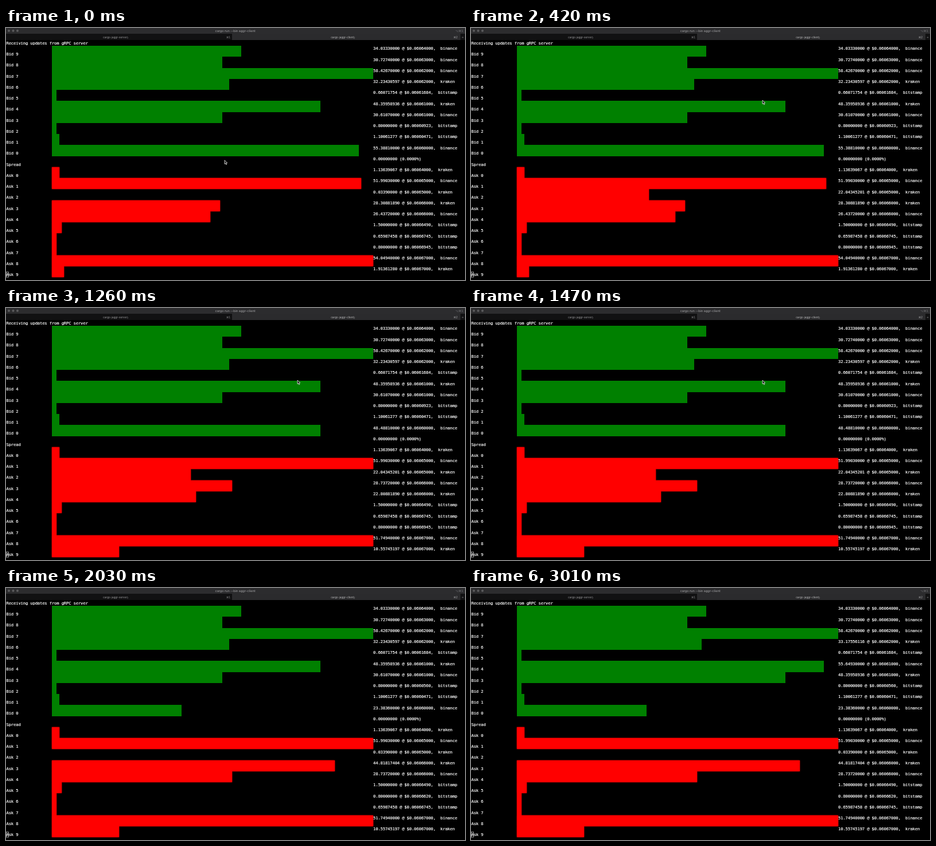
Recreate the animation shown at these times as an HTML page with a canvas. Size 800 by 440 pixels, loop 3.08 s.

```html
<!DOCTYPE html>
<html lang="en">
<head>
<meta charset="utf-8">
<title>Order book</title>
<style>
html, body { margin: 0; width: 100%; height: 100%; overflow: hidden; background: #000; }
canvas { display: block; width: 800px; height: 440px; }
</style>
</head>
<body>
<canvas id="stage" width="800" height="440"></canvas>
<script>
const ctx = document.getElementById('stage').getContext('2d');
const LOOP = 3080, STEP = 70;
const CELL = 4.18, LEFT = 0.6, LINE = 9.625, TOP = 31;
const MAX_CELLS = 134, BID_SCALE = 2.308;
const MONO = '"DejaVu Sans Mono", "Liberation Mono", monospace';
const SANS = 'Inter, "Liberation Sans", sans-serif';
const SYMBOLS = '"DejaVu Sans", sans-serif';

// Each row: size, price, exchange. Rows run from Bid 9 down to Ask 9.
const START = [
  '34.0333 .06064 binance', '30.7274 .06063 binance', '58.4267 .06062 binance',
  '32.23430597 .06062 kraken', '0.66071754 .06061684 bitstamp',
  '48.35958936 .06061 kraken', '30.6107 .06061 binance', '0.8 .06060923 bitstamp',
  '1.10061277 .06060471 bitstamp', '55.3881 .0606 binance',
  '',
  '1.13639067 .06064 kraken', '51.9903 .06065 binance', '0.0339 .06065 kraken',
  '28.3088189 .06066 kraken', '26.4372 .06066 binance', '1.5 .0606649 bitstamp',
  '0.65987458 .06066745 bitstamp', '0.8 .06066945 bitstamp',
  '54.0494 .06067 binance', '1.9136128 .06067 kraken'
];

const UPDATES = [
  { at: 210, rows: { 13: '22.04345201 .06065 kraken' } },
  { at: 630, rows: { 14: '26.4372 .06066 binance', 15: '22.8088189 .06066 kraken',
                     20: '5.05745197 .06067 kraken' } },
  { at: 1050, rows: { 9: '48.4881 .0606 binance', 14: '28.7372 .06066 binance',
                      19: '51.7494 .06067 binance', 20: '10.55745197 .06067 kraken' } },
  { at: 1540, rows: { 7: '0.8 .0606056 bitstamp', 9: '23.3836 .0606 binance',
                      13: '0.0339 .06065 kraken', 14: '44.81817404 .06066 kraken',
                      15: '28.7372 .06066 binance', 17: '0.8 .0606662 bitstamp',
                      18: '0.65987458 .06066745 bitstamp' } },
  { at: 2170, rows: { 5: '55.6493 .06061 binance', 6: '48.35958936 .06061 kraken' } },
  { at: 2730, rows: { 3: '33.17556116 .06062 kraken' } }
];

function bookAt(t) {
  const book = START.slice();
  for (const u of UPDATES) if (t >= u.at) Object.assign(book, u.rows);
  return book.map(r => {
    const [size, price, venue] = r.split(' ');
    return { size: +size, price: +price, venue };
  });
}

function rect(x, y, w, h, color) {
  ctx.fillStyle = color;
  ctx.fillRect(x, y, w, h);
}

// Set large and scaled down, so that glyph positions stay fractional.
function text(str, x, y, font, size, color, align, edge) {
  ctx.save();
  ctx.translate(x, y);
  ctx.scale(0.1, 0.1);
  ctx.font = `${font.weight || 400} ${size * 10}px ${font.family}`;
  ctx.textAlign = align;
  ctx.fillStyle = ctx.strokeStyle = color;
  ctx.fillText(str, 0, 0);
  if (edge) {
    ctx.lineWidth = edge * 10;
    ctx.lineJoin = 'round';
    ctx.strokeText(str, 0, 0);
  }
  ctx.restore();
}

// Terminal text: one glyph in the middle of each cell.
function mono(str, col, top) {
  [...str].forEach((ch, i) => {
    if (ch === ' ') return;
    const x = LEFT + (col + i + 0.5) * CELL;
    text(ch, x, top + 7.4, { family: MONO }, 7.3, '#fff', 'center', 0.18);
  });
}

function header() {
  const sans = { family: SANS, weight: 500 }, symbols = { family: SYMBOLS };
  rect(0, 0, 800, 10, '#2c2c2e');
  rect(0, 10, 800, 11, '#111112');
  rect(394, 10, 398, 11, '#2b2b2d');
  for (let i = 0; i < 3; i++) {
    ctx.fillStyle = '#5a5a5c';
    ctx.beginPath();
    ctx.arc(5 + i * 7.5, 4.8, 2.1, 0, 7);
    ctx.fill();
  }
  text('cargo run --bin aggr-client', 399.5, 6.7, sans, 5.5, '#98989a', 'center');
  text('⌥⌘1', 797, 6.6, symbols, 5, '#77777a', 'right');
  text('cargo (aggr-server)', 191, 17.6, sans, 4.65, '#8c8c8e', 'center');
  text('cargo (aggr-client)', 587, 17.6, sans, 4.65, '#a8a8aa', 'center');
  text('⌘1', 387.5, 17.6, symbols, 4.4, '#8c8c8e', 'center');
  text('⌘2', 783.5, 17.6, symbols, 4.4, '#a8a8aa', 'center');
  text('+', 796, 18, sans, 6, '#77777a', 'center');
}

function bar(i, cells, bid) {
  if (!cells) return;
  const x = LEFT + 19 * CELL;
  const left = Math.round(x), right = Math.round(x + cells * CELL);
  const top = Math.round(TOP + i * 2 * LINE);
  const bottom = Math.round(TOP + (i + 1) * 2 * LINE);
  ctx.save();
  if (!bid) {
    ctx.shadowColor = '#f00';
    ctx.shadowBlur = 2;
  }
  rect(left, top, right - left, bottom - top, bid ? '#008000' : '#f00');
  ctx.restore();
}

function rows(book) {
  const peak = Math.max(...book.slice(11).map(r => r.size));
  const askScale = peak > 54 ? 2.48 : 2.625;
  book.forEach((r, i) => {
    const bid = i < 10;
    const cells = Math.round(r.size * (bid ? BID_SCALE : askScale));
    bar(i, Math.min(MAX_CELLS, cells), bid);
  });
  book.forEach((r, i) => {
    const y = TOP + i * 2 * LINE;
    const label = i < 10 ? 'Bid ' + (9 - i) : i > 10 ? 'Ask ' + (i - 11) : 'Spread';
    const level = r.venue
      ? `${r.size.toFixed(8)} @ $${r.price.toFixed(8)},  ${r.venue}`
      : '0.00000000 (0.0000%)';
    mono(label, 0, y + LINE);
    mono(level, 153, y);
  });
}

function pointer(t) {
  if (t >= 1540) return;
  const p = Math.min(1, t / 350);
  const e = p * p * (3 - 2 * p);
  ctx.save();
  ctx.translate(381 + 127 * e, 230.8 - 104.8 * e);
  ctx.beginPath();
  [[0, 0], [0, 6.6], [1.5, 5.3], [2.6, 7.8], [3.7, 7.3], [2.7, 4.9], [4.7, 4.8]]
    .forEach(([x, y]) => ctx.lineTo(x, y));
  ctx.closePath();
  ctx.fillStyle = '#111';
  ctx.strokeStyle = '#eee';
  ctx.lineWidth = 0.8;
  ctx.fill();
  ctx.stroke();
  ctx.restore();
}

function draw(t) {
  rect(0, 0, 800, 440, '#000');
  header();
  mono('Receiving updates from gRPC server', 0, TOP - LINE);
  rows(bookAt(t));
  ctx.strokeStyle = '#c8c8c8';
  ctx.lineWidth = 0.8;
  ctx.strokeRect(0.5, 426, 4, 9);
  pointer(t);
}

const begin = performance.now();
function tick() {
  const t = (performance.now() - begin) % LOOP;
  draw(Math.floor(t / STEP) * STEP);
  requestAnimationFrame(tick);
}
tick();
</script>
</body>
</html>
```
